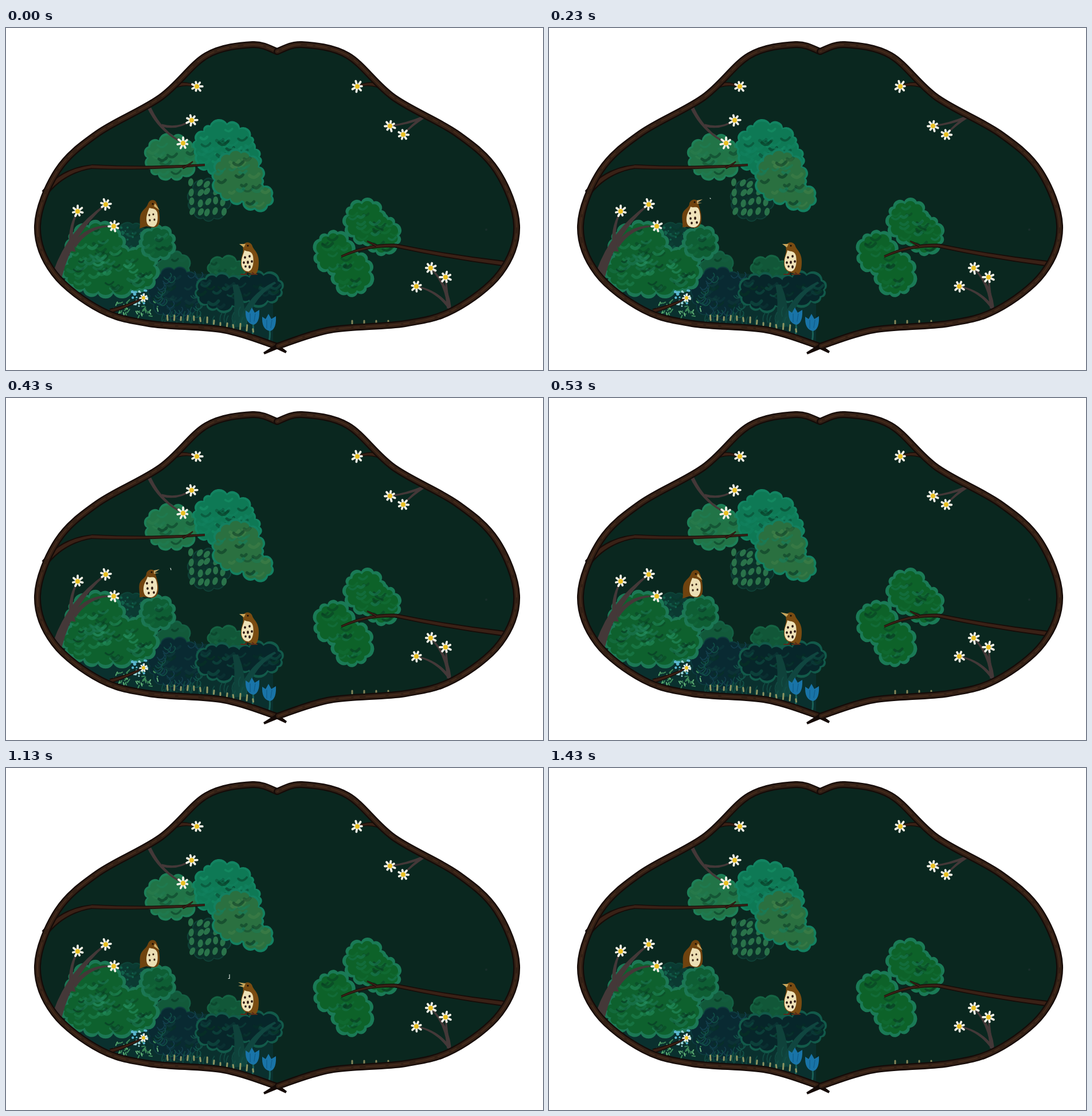
Animation of 937x597 px, one loop 4430 ms. Source, as an HTML page:

```html
<!DOCTYPE html>
<html lang="en">
<head>
<meta charset="utf-8">
<title>Singing birds</title>
<style>
html, body { margin: 0; width: 100%; height: 100%; overflow: hidden; background: #fff; }
svg { display: block; width: 937px; height: 597px; }
path { stroke-linecap: round; stroke-linejoin: round; }
</style>
</head>
<body>
<svg id="stage" viewBox="0 0 937 597">
  <clipPath id="inside"><path id="window"/></clipPath>
  <g id="back"></g>
  <g id="scene" clip-path="url(#inside)"></g>
  <g id="front"></g>

  <g id="rest1">
    <path fill="#70430f" d="M248 306C251 299 260 298 263 306C266 313 269 326 268 338C267 346 262 349 255 348L245 346L233 350C235 343 232 333 235 325C238 317 246 314 248 306Z"/>
    <path fill="#ecdfb4" d="M250 314C256 316 261 314 264 322C266 334 264 346 257 347C249 347 245 343 245 334C245 326 248 320 250 314Z"/>
    <path fill="#cfae68" d="M260 306L268 318L258 311Z"/>
    <path fill="none" stroke="#3b2312" stroke-width="3" d="M250 326v1M257 325v.5M251 335v1M259 334v1"/>
    <circle cx="256" cy="307" r="1.5" fill="#160d07"/>
  </g>
  <g id="sing1">
    <path fill="#70430f" d="M245 306C247 299 256 297 260 303C261 311 266 320 266 332C266 343 262 349 253 349L241 347L233 348C234 342 231 332 233 324C236 315 245 314 245 306Z"/>
    <path fill="#efe3bb" d="M247 312C253 315 259 309 262 318C266 331 265 347 252 348C242 348 239 340 240 331C241 322 245 319 247 312Z"/>
    <path fill="#c2a268" d="M258 301L268 299L259 305L267 305L258 307Z"/>
    <path fill="none" stroke="#2b160b" stroke-width="3.5" d="M246 323v1M255 321v1M247 332v1M255 331v2M249 340v1M258 339v1"/>
    <circle cx="254" cy="304" r="1.5" fill="#160d07"/>
  </g>
  <g>
    <path fill="#7a4c12" d="M413 381C415 372 428 372 430 381C432 387 441 392 441 408C441 420 439 428 434 431L427 428C415 427 409 420 410 408C410 398 416 392 413 381Z"/>
    <path fill="#efe2b8" d="M416 388C422 391 428 388 431 398C433 412 430 423 423 425C414 425 410 416 411 408C411 400 415 394 416 388Z"/>
    <path fill="none" stroke="#2a140e" stroke-width="3.5" d="M417 400v1M425 398v1M415 409v1M422 408v2M429 407v1M418 416v.5M425 416v2"/>
    <path fill="none" stroke="#5a2a17" stroke-width="2" d="M410 430h9M424 430h14M421 426l-4 4M430 427l3 3"/>
    <circle cx="422" cy="380" r="1.6" fill="#160d07"/>
  </g>
  <g fill="#c8a75d">
    <path id="beak2" d="M407 377L418 377L415 383Z"/>
    <path id="up2" d="M404 374L418 377L414 382Z"/>
    <path id="open2" d="M405 374L418 376L415 383L405 380L414 379Z"/>
  </g>
  <g id="notes" fill="none" stroke="#e8efe9" stroke-width="1.1"></g>
</svg>
<script>
const LOOP = 4430, STEP = 100;
const $ = id => document.getElementById(id);
const scene = $('scene'), front = $('front');

let seed = 11;
const rand = (lo = 0, hi = 1) => lo + (hi - lo) * (seed = seed * 16807 % 2147483647) / 2147483647;
const times = (n, fn) => { for (let i = 0; i < n; i++) fn(i); };

function add(parent, tag, attrs) {
  const el = document.createElementNS('http://www.w3.org/2000/svg', tag);
  for (const k in attrs) el.setAttribute(k, attrs[k]);
  return parent.appendChild(el);
}
const fill = (d, color, parent = scene) => add(parent, 'path', { d, fill: color });
const line = (d, color, width, parent = scene, extra = {}) =>
  add(parent, 'path', { d, fill: 'none', stroke: color, 'stroke-width': width, ...extra });
const dot = (x, y, r, color, parent = scene) => add(parent, 'circle', { cx: x, cy: y, r, fill: color });

// Smooth curve through points
function spline(p) {
  let d = 'M' + p[0];
  for (let i = 0; i < p.length - 1; i++) {
    const a = p[i - 1] || p[i], b = p[i], c = p[i + 1], e = p[i + 2] || c;
    d += `C${b[0] + (c[0] - a[0]) / 6},${b[1] + (c[1] - a[1]) / 6} ` +
         `${c[0] - (e[0] - b[0]) / 6},${c[1] - (e[1] - b[1]) / 6} ${c}`;
  }
  return d;
}

// Bent, tapered branch from a to b
function limb(a, b, bend, w0, w1, color, parent = scene) {
  const dx = b[0] - a[0], dy = b[1] - a[1], len = Math.hypot(dx, dy);
  const mid = [(a[0] + b[0]) / 2, (a[1] + b[1]) / 2];
  const off = (p, k) => [p[0] - dy / len * k, p[1] + dx / len * k];
  const w = (w0 + w1) / 4;
  fill(`M${off(a, w0 / 2)}Q${off(mid, bend + w)} ${off(b, w1 / 2)}` +
       `L${off(b, -w1 / 2)}Q${off(mid, bend - w)} ${off(a, -w0 / 2)}Z`, color, parent);
}
function bark(a, b, bend, w0, w1) {
  limb(a, b, bend, w0, w1, '#170c08', front);
  limb(a, b, bend, w0 * .6, w1 * .6, '#3a2116', front);
}

function flower([x, y], r = 9.5) {
  times(7, i => {
    const t = i * Math.PI * 2 / 7 + x, l = r * rand(.8, 1.05);
    line(`M${x},${y}l${l * Math.cos(t)},${l * Math.sin(t)}`, '#f3f1e6', r * .4, front);
  });
  dot(x, y, r * .42, '#e9bf22', front);
}
function stem(a, b, bend, width) {
  limb(a, b, bend, width, 2.5, '#443838');
  flower(b);
}

// Scalloped outline around an ellipse
function scallop([cx, cy, rx, ry]) {
  const n = Math.round(Math.PI * (rx + ry) / 24);
  const p = [];
  times(n, i => {
    const t = (i + rand(-.2, .2)) * Math.PI * 2 / n, k = rand(.84, .95);
    p.push([cx + rx * k * Math.cos(t), cy + ry * k * Math.sin(t)]);
  });
  return 'M' + p[0] + p.map((a, i) => {
    const b = p[(i + 1) % n], r = Math.hypot(b[0] - a[0], b[1] - a[1]) * .56;
    return `A${r} ${r} 0 0 1 ${b}`;
  }).join('');
}

// Foliage made of merged puffs [cx, cy, rx, ry], with brushed crescents
function foliage(puffs, color, rim, light, edge = 4) {
  const shapes = puffs.map(scallop);
  shapes.forEach(d => fill(d, rim));
  puffs.forEach(([cx, cy, rx, ry], i) => {
    add(scene, 'path', { d: shapes[i], fill: color,
      transform: `translate(${cx} ${cy}) scale(${1 - edge / rx} ${1 - edge / ry}) translate(${-cx} ${-cy})` });
  });
  puffs.forEach(([cx, cy, rx, ry]) => times(rx * ry / 130, i => {
    const t = rand(0, 6.28), k = Math.sqrt(rand(0, .55)), r = rand(4, 9);
    line(`M${cx + rx * k * Math.cos(t) - r},${cy + ry * k * Math.sin(t)}q${r},${r} ${r * 2},${-r * .3}`,
      [rim, light, '#073522'][i % 3], rand(3, 6), scene, { opacity: rand(.3, .6) });
  }));
}

// Frame: one half, mirrored
const flip = ([x, y]) => [946 - x, y];
const left = [[473, 41], [430, 29], [350, 48], [270, 121], [160, 184], [90, 249], [55, 345],
              [84, 428], [165, 492], [250, 516], [380, 527], [471, 555]];
const right = left.map(flip);
const hole = spline(left) + spline(right.slice().reverse()).replace('M', 'L') + 'Z';
$('window').setAttribute('d', hole);
fill(hole, '#0a271f', $('back'));

// Upper tree
foliage([[355, 300, 39, 38]], '#0b3029', '#0f4137', '#0d3a31', 2);
times(20, i => {
  const x = 324 + i % 5 * 14 + rand(-2, 2), y = 270 + Math.floor(i / 5) * 17 + rand(-3, 3);
  add(scene, 'ellipse', { cx: x, cy: y, rx: 4.5, ry: 7, fill: '#2a734a', transform: `rotate(${rand(0, 40)} ${x} ${y})` });
});
foliage([[289, 226, 50, 41]], '#217447', '#1d7f57', '#2e8250');
foliage([[380, 203, 59, 39], [388, 225, 62, 37]], '#0e7955', '#128361', '#18936a');
foliage([[405, 259, 48, 49], [437, 294, 31, 25]], '#2a7040', '#138060', '#47834a');

// Right tree
foliage([[627, 338, 40, 42], [655, 361, 36, 37], [572, 392, 37, 40], [604, 428, 37, 43]], '#0d6229', '#1a7a56', '#137139', 6);

// Undergrowth
fill('M130,460Q300,405 440,445L466,470V550L300,530L150,500Z', '#0a302e');
foliage([[218, 368, 32, 28]], '#0b3a32', '#0d4438', '#12614c', 2);
times(24, () => dot(rand(192, 240), rand(346, 380), rand(1.2, 2.4), '#12614c'));
foliage([[293, 416, 30, 26]], '#12593a', '#145f43', '#176b47', 3);
foliage([[294, 464, 48, 46]], '#092a32', '#0d3b3e', '#11443f', 2);
times(26, i => line(`M${rand(255, 335)},${rand(432, 502)}q5,8 11,1q4,-5 0,-8`, i % 2 ? '#125248' : '#143f4e', 1.6));
foliage([[158, 383, 54, 47], [176, 424, 89, 46], [236, 418, 30, 44]], '#0e612e', '#1c7855', '#279465', 6);
foliage([[265, 376, 33, 32]], '#0e5e34', '#1b7654', '#17703f', 6);
foliage([[384, 419, 36, 19]], '#115738', '#156343', '#197047', 3);

// Low dark tree
foliage([[375, 461, 50, 33], [440, 455, 48, 28]], '#07262a', '#125a4a', '#0d3d3a', 4);
limb([404, 522], [400, 448], 10, 24, 10, '#0f423b');
limb([412, 518], [470, 444], -20, 15, 4, '#104640');
times(24, () => line(`M${rand(270, 440)},${rand(486, 514)}q-5,8 -2,16`, '#145248', 2, scene, { opacity: .7 }));

// Flower bed
times(40, i => line(`M${rand(190, 264)},${rand(478, 503)}l${rand(-6, 6)},${rand(-6, 6)}`, i % 3 ? '#3d8a5a' : '#64b27a', 2));
times(22, i => dot(rand(220, 248), rand(458, 486), rand(1.2, 2.8), i % 2 ? '#58b6cf' : '#9bd4d8'));
for (const [x, y] of [[430, 502], [459, 513]]) {
  line(`M${x},${y + 10}q3,10 0,24`, '#196058', 3);
  fill(`M${x - 12},${y - 9}l6,4l5,-9l5,9l8,-5q1,23 -10,26q-15,-2 -14,-25Z`, '#1974a8');
  line(`M${x - 4},${y - 3}v14M${x + 5},${y - 3}l-2,13`, '#12608f', 1.5);
}
times(14, i => {
  const x = 282 + i * 11.5;
  line(`M${x},${510 + Math.max(0, x - 330) * .2}l${rand(-1, 1)},${rand(-10, -4)}`, '#8f9562', 3);
});
times(4, i => line(`M${604 + i * 21},516v-5`, '#85865a', 3));
dot(838, 352, 2, '#182e2b');

// Flowering stems
stem([90, 430], [174, 308], -24, 18);
stem([117, 390], [125, 320], -14, 9);
stem([119, 380], [188, 346], -22, 9);
stem([248, 135], [309, 201], 16, 7);
stem([272, 170], [324, 161], 12, 5);
stem([728, 156], [670, 171], -4, 5);
stem([728, 156], [693, 186], 3, 5);
stem([775, 490], [716, 451], 14, 6);
stem([773, 488], [741, 419], 14, 8);
stem([770, 472], [767, 435], 0, 5);

// Branches
bark([66, 290], [150, 242], -20, 13, 8);
bark([149, 242], [347, 239], 6, 8, 4);
bark([308, 244], [326, 233], 2, 5, 2);
bark([868, 411], [680, 380], -4, 10, 7);
bark([681, 380], [585, 399], 12, 7, 4);
bark([646, 380], [630, 372], 0, 5, 2);
const tip = [333, 102];
bark([287, 104], tip, -10, 10, 4);
bark(flip([287, 104]), flip(tip), 10, 10, 4);
flower(tip);
flower(flip(tip));
bark([182, 494], [240, 471], 4, 8, 3);
flower([240, 471], 7);

// Vines
[left, right].forEach((half, i) => {
  const end = half[half.length - 1], tail = i ? [450, 568] : [489, 566];
  const d = spline(half);
  limb(end, tail, 0, 9, 4, '#150b08', front);
  line(d, '#150b08', 12, front);
  line(d, '#332015', 7.5, front);
  line(d, '#523322', 2, front, { 'stroke-dasharray': '20 7 33 12 9 6', 'stroke-dashoffset': i * 17, opacity: .6 });
});

// Show an element only within the given spans of the loop (ms)
const sheet = document.styleSheets[0];
function during(el, ...spans) {
  const at = t => (t / LOOP * 100).toFixed(4) + '%';
  const name = 'show' + sheet.cssRules.length;
  const keys = spans.map(([a, b]) => `${at(a)}{opacity:1}${at(b)}{opacity:0}`).join('');
  sheet.insertRule(`@keyframes ${name}{0%{opacity:0}${keys}}`, sheet.cssRules.length);
  el.style.animation = `${name} ${LOOP}ms step-end infinite`;
}
function note(d, from) {
  during(add($('notes'), 'path', { d }), [from, from + STEP]);
}

during($('rest1'), [0, 30], [530, LOOP]);
during($('sing1'), [30, 530]);
during($('beak2'), [0, 530], [1230, LOOP]);
during($('up2'), [530, 1030]);
during($('open2'), [1030, 1230]);

// Notes drift away from each beak, one step at a time
times(4, i => {
  note(`M${278 + i * 3},297l1,${i}`, 130 + i * STEP);
  note(`M${396 - i * 6},${365 - i * 4.5}v${8 - i}h-2`, 1030 + i * STEP);
  if (i > 1) note(`M${399 - i * 3},${370 - i * 0.5}h-2m2,0v-8l7,-1v8h-2`, 1030 + i * STEP);
});
</script>
</body>
</html>
```
